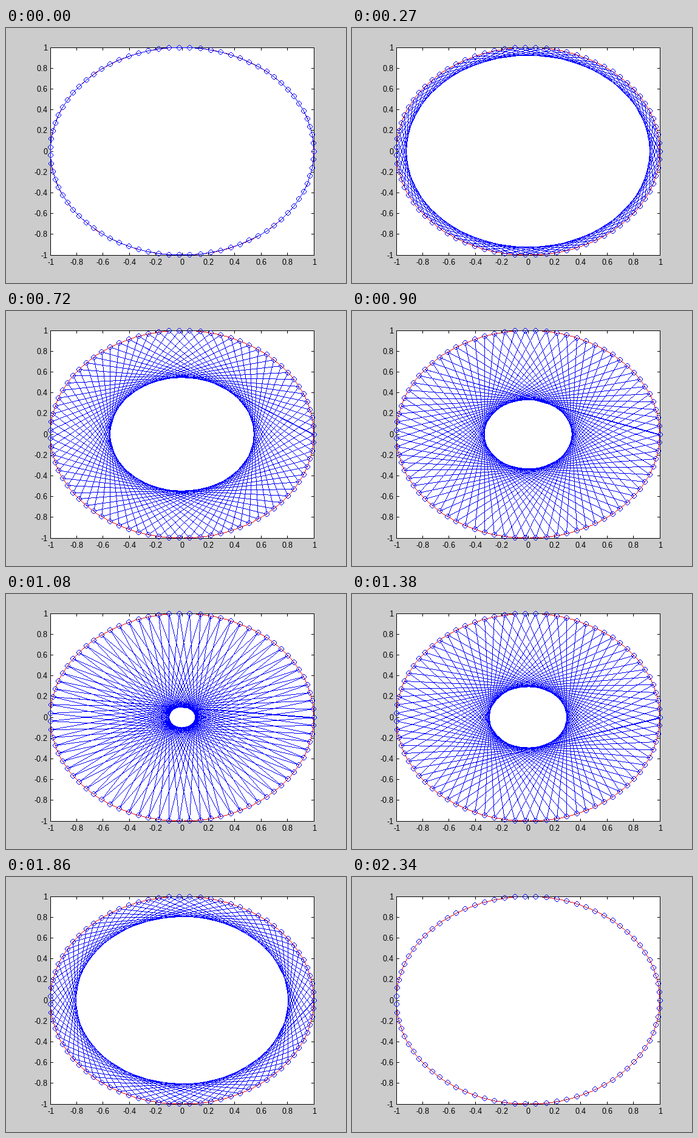
A matplotlib script for the animation above (2.37 s loop, 560 by 420 pixels).

```python
import numpy as np
import matplotlib.pyplot as plt
from matplotlib.animation import FuncAnimation

W, H, DPI = 560, 420, 100
LEFT, RIGHT, TOP, BOTTOM = 73, 507, 32, 374
N = 79                             # points on the circle, also frames per loop
TICK, RADIUS = 4, 4
GREY, WHITE, BLACK = (204, 204, 204), (255, 255, 255), (0, 0, 0)
RED, BLUE = (255, 0, 0), (0, 0, 255)

plt.rcParams.update({"text.hinting": "native", "text.hinting_factor": 1})


def to_px(x, y):
    """Map data in [-1, 1] to whole stage pixels."""
    px = LEFT + (x + 1) / 2 * (RIGHT - LEFT)
    py = BOTTOM - (y + 1) / 2 * (BOTTOM - TOP)
    return np.floor(np.stack([px, py], axis=-1) + 1e-9).astype(int)


def draw_line(img, a, b, color):
    """One-pixel line without smoothing."""
    a, b = np.asarray(a), np.asarray(b)
    n = max(np.abs(b - a).max(), 1)
    t = np.arange(n + 1)[:, None] / n
    p = np.floor(a + (b - a) * t + 0.5).astype(int)
    img[p[:, 1], p[:, 0]] = color


def draw_markers(img):
    span = np.arange(-RADIUS, RADIUS + 1)
    dx, dy = np.meshgrid(span, span)
    dist = np.hypot(dx, dy)
    rim = (dist > RADIUS - 0.5) & (dist < RADIUS + 0.2)
    for x, y in points:
        img[y + dy[rim], x + dx[rim]] = BLUE


def draw_box(img):
    corners = [(LEFT, TOP), (RIGHT, TOP), (RIGHT, BOTTOM), (LEFT, BOTTOM)]
    for a, b in zip(corners, corners[1:] + corners[:1]):
        draw_line(img, a, b, BLACK)
    for v in ticks:
        x, y = to_px(v, v)
        draw_line(img, (x, BOTTOM), (x, BOTTOM - TICK), BLACK)
        draw_line(img, (x, TOP), (x, TOP + TICK), BLACK)
        draw_line(img, (LEFT, y), (LEFT + TICK, y), BLACK)
        draw_line(img, (RIGHT, y), (RIGHT - TICK, y), BLACK)


ticks = np.arange(-5, 6) / 5
angle = 2 * np.pi * np.arange(N) / N
points = to_px(np.cos(angle), np.sin(angle))
# the closing point lands one pixel below the first
starts = np.vstack([points, points[0] + [0, 1]])

arc = np.linspace(0, 2 * np.pi, 4 * N + 1)
ring = to_px(np.cos(arc), np.sin(arc))

base = np.full((H, W, 3), GREY, dtype=np.uint8)
base[TOP:BOTTOM + 1, LEFT:RIGHT + 1] = WHITE
for a, b in zip(ring, ring[1:]):
    draw_line(base, a, b, RED)
draw_box(base)


def picture(step):
    img = base.copy()
    for i, start in enumerate(starts):
        draw_line(img, start, points[(i + step) % N], BLUE)
    draw_markers(img)
    return img


fig = plt.figure(figsize=(W / DPI, H / DPI), dpi=DPI, facecolor="#cccccc")
ax = fig.add_axes([0, 0, 1, 1])
ax.axis("off")
stage = ax.imshow(picture(1), interpolation="nearest", aspect="auto")
# whole numbers fall on pixel centres
ax.set_xlim(-0.5, W - 0.5)
ax.set_ylim(H - 0.5, -0.5)

font = dict(family="Liberation Sans", size=13.33 * 72 / DPI, color="black")
for v in ticks:
    x, y = to_px(v, v)
    ax.text(x, 389.5, f"{v:g}", ha="center", va="baseline", **font)
    ax.text(68, y + 4.5, f"{v:g}", ha="right", va="baseline", **font)


def update(frame):
    stage.set_data(picture(frame + 1))
    return [stage]


anim = FuncAnimation(fig, update, frames=N, interval=30, repeat=True)
plt.show()
```
